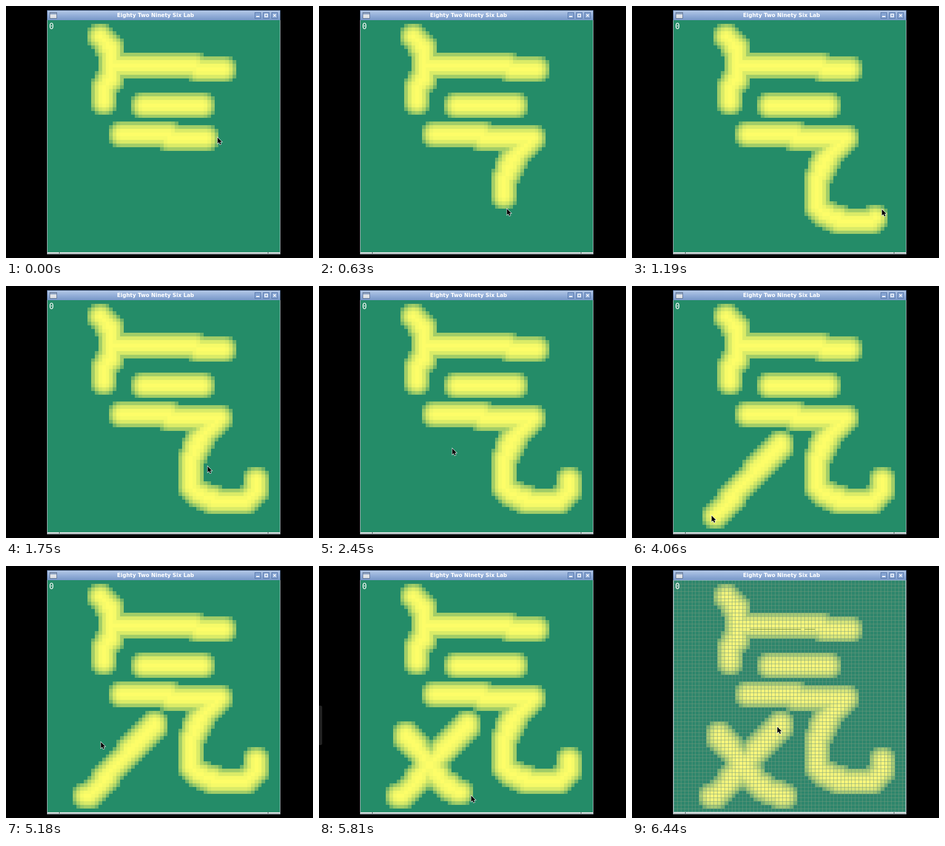
Write an HTML page with a canvas that moves like this. It is 584 px wide and 480 px high and loops after 6510 ms.

```html
<!DOCTYPE html>
<html lang="en">
<head>
<meta charset="utf-8">
<title>Paint grid</title>
<style>
  html, body { margin: 0; width: 100%; height: 100%; overflow: hidden; background: #000; }
  canvas { position: absolute; left: 0; top: 0; }
  .title, .count { position: absolute; color: #fff; white-space: pre; }
  .title { left: 79px; width: 411px; top: 10px; text-align: center;
    font: bold 10.05px/15px "DejaVu Sans", sans-serif; }
  .count { left: 82px; top: 31px; font: 15px/17px "DejaVu Sans Mono", monospace; }
</style>
</head>
<body>
<canvas id="stage" width="584" height="480"></canvas>
<div class="title">Eighty Two Ninety Six Lab</div>
<div class="count">0</div>
<script>
const ctx = document.getElementById('stage').getContext('2d');
const LOOP = 6510, STEP = 70, LAG = 100;
const LEFT = 79, TOP = 27, SIZE = 442, CELLS = 64, PITCH = SIZE / CELLS;
const GRID_ON = 6160, TAB_ON = 5740, TAB_OFF = 6440;

// Evenly spaced points along a path given in cell coordinates
function trace(d) {
  const path = document.createElementNS('http://www.w3.org/2000/svg', 'path');
  path.setAttribute('d', d);
  const length = path.getTotalLength(), n = Math.ceil(length / .7);
  return Array.from({ length: n + 1 }, (_, i) => path.getPointAtLength(length * i / n));
}

// Strokes already on the board
const ready = [
  'M14 4L16 6V7H17V15L15 19V22',
  'M17 12L48 12.65',
  'M26 23H42',
  'M20 31L43 31.9'
].map(trace);

// Pointer moves in order; each lasts until `end`
const moves = [
  { start: -LAG, end: 1260, pen: true, d: 'M43 32H47L42 37Q39 42 39 46V50Q40 53 46 55H54L57 52V49' },
  { start: 1260, end: 2450, d: 'M57 49L24.9 40.5' },
  { start: 2450, end: 2800, d: 'M24.9 40.5L29 39' },
  { start: 2800, end: 4020, pen: true, d: 'M29 39L11 59H10' },
  { start: 4060, end: 5180, d: 'M10 59L14.3 44.2' },
  { start: 5180, end: 5250, d: 'M14.3 44.2L12 42' },
  { start: 5250, end: 5760, pen: true, d: 'M12 42L22 55Q25 58 30 59' },
  { start: 5810, end: 6440, d: 'M30 59L28.1 40' }
].map(m => ({ ...m, points: trace(m.d) }));

const edge = i => Math.round(i * PITCH);
const mix = (a, b, k) => a.map((v, i) => Math.round(v + (b[i] - v) * k));

function box(color, x, y, w, h) {
  ctx.fillStyle = color;
  ctx.fillRect(x, y, w, h);
}

// Index of the point a move has reached at time t
function reached({ start, end, points }, t) {
  const k = Math.min(1, (t - start) / (end - start));
  return Math.round(k * (points.length - 1));
}

function stamp(cells, point) {
  const cx = Math.round(point.x), cy = Math.round(point.y);
  for (let y = -3; y <= 3; y++) for (let x = -3; x <= 3; x++) {
    const d = Math.hypot(x, y);
    if (d > 4) continue;
    const i = (cy + y) * CELLS + cx + x;
    cells[i] = Math.max(cells[i], 1 - (d / 4.3) ** 2.4);
  }
}

const base = new Float32Array(CELLS * CELLS);
ready.flat().forEach(p => stamp(base, p));

function drawBoard(t) {
  const cells = base.slice();
  const inkTime = t - LAG; // paint trails the pointer
  for (const m of moves)
    if (m.pen && inkTime >= m.start)
      m.points.slice(0, reached(m, inkTime) + 1).forEach(p => stamp(cells, p));

  const grid = t >= GRID_ON;
  const back = grid ? [46, 134, 108] : [36, 140, 104];
  const paint = grid ? [248, 246, 124] : [253, 253, 104];
  box(`rgb(${back})`, LEFT, TOP, SIZE, SIZE);
  cells.forEach((v, i) => {
    if (!v) return;
    const c = i % CELLS, r = Math.floor(i / CELLS);
    box(`rgb(${mix(back, paint, v)})`, LEFT + edge(c), TOP + edge(r),
      edge(c + 1) - edge(c), edge(r + 1) - edge(r));
  });
  if (grid) drawGrid();
}

function drawGrid() {
  const line = 'rgba(115,155,125,.6)', seam = 'rgba(80,115,40,.8)';
  for (let i = 1; i < CELLS; i++) {
    box(line, LEFT + edge(i), TOP, 1, SIZE);
    box(line, LEFT, TOP + edge(i), SIZE, 1);
  }
  ctx.strokeStyle = 'rgba(190,215,215,.6)';
  ctx.lineWidth = 1;
  ctx.strokeRect(LEFT + .5, TOP + .5, SIZE - 1, SIZE - 1);
  box(seam, 225, 120, 96, 1);
  box(seam, 328, 120, 20, 1);
}

function drawWindow() {
  box('#000', 0, 0, 584, 480);
  box('#b4c0c6', 78, 27, 444, 446);
  box('#5f7ba8', 78, 8, 444, 19);
  const bar = ctx.createLinearGradient(0, 9, 0, 27);
  bar.addColorStop(0, '#b4c8e6');
  bar.addColorStop(.5, '#93aed8');
  bar.addColorStop(1, '#7898c8');
  box(bar, LEFT, 9, SIZE, 18);

  box('#5d6f8c', 83, 12, 14, 12);
  box('#dfe3e8', 84, 13, 12, 10);
  box('#8fa3c2', 84, 13, 12, 3);

  for (let i = 0; i < 3; i++) {
    box('#5574a8', 473 + 16 * i, 12, 12, 12);
    box('#86a4d2', 474 + 16 * i, 13, 10, 10);
  }
  box('#fff', 476, 19, 6, 2);
  ctx.strokeStyle = '#fff';
  ctx.lineWidth = 1.6;
  ctx.strokeRect(492.5, 15.5, 5, 5);
  ctx.stroke(new Path2D('M508.5 15.5l5 5m0 -5l-5 5'));

  box('#e4e7e8', LEFT, 469, SIZE, 3);
  box('#8d9698', LEFT, 471, SIZE, 1);
  for (const x of [101, 498]) box('#39444a', x, 469, 1, 3);
}

const arrow = new Path2D('M0 0V11.5L2.7 9L4.6 13.2L6.6 12.3L4.8 8.2H8.3Z');

function drawPointer(t) {
  const move = moves.findLast(m => m.start <= t);
  const p = move.points[reached(move, t)];
  ctx.save();
  ctx.translate(Math.round(LEFT + (p.x + .5) * PITCH) - .5, Math.round(TOP + (p.y + .5) * PITCH) - .5);
  ctx.strokeStyle = '#fff';
  ctx.lineWidth = 1.4;
  ctx.stroke(arrow);
  ctx.fillStyle = '#000';
  ctx.fill(arrow);
  ctx.restore();
}

function drawTab() {
  ctx.fillStyle = '#222';
  ctx.beginPath();
  ctx.roundRect(-4, 266, 10, 75, 3);
  ctx.fill();
}

function render(t) {
  drawWindow();
  drawBoard(t);
  drawPointer(t);
  if (t >= TAB_ON && t < TAB_OFF) drawTab();
}

const begin = performance.now();
let last = -1;
function tick() {
  const t = Math.floor(((performance.now() - begin) % LOOP) / STEP) * STEP;
  if (t !== last) render(last = t);
  requestAnimationFrame(tick);
}
tick();
</script>
</body>
</html>
```
